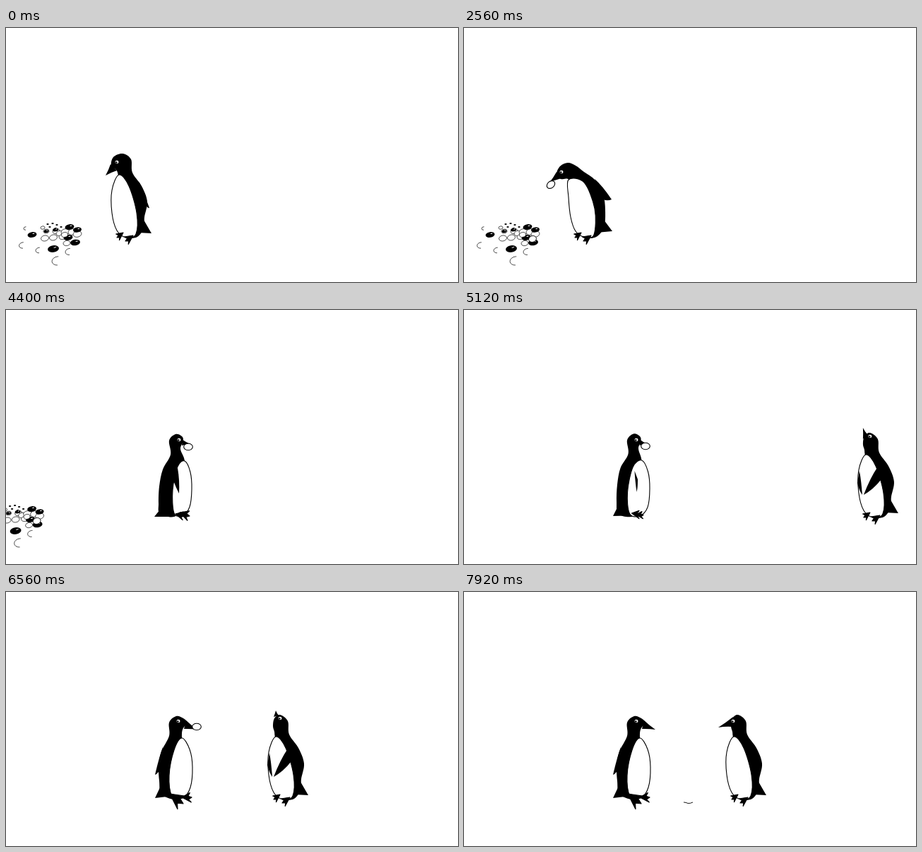
An HTML page with a canvas that plays this animation: 640x360 px, repeating every 8 s.

```html
<!DOCTYPE html>
<html lang="en">
<head>
<meta charset="utf-8">
<title>Penguins and a pebble</title>
<style>
html, body { margin: 0; width: 100%; height: 100%; overflow: hidden; background: #fff; }
canvas { display: block; width: 100vw; height: 100vh; }
</style>
</head>
<body>
<canvas id="stage" width="640" height="360"></canvas>
<script>
const ctx = document.getElementById('stage').getContext('2d');
const LOOP = 8000, STEP = 80, SPEED = 0.1335;

// Poses: flat x,y lists. Every pose has the same parts and point order.
const stand = {
  body: [149,195, 152,183, 165,178, 177,186, 179,205, 192,224, 200,246,
         196,268, 195,284, 184,297, 170,290, 164,235, 159,209, 156,201],
  belly: [160,208, 150,230, 150,262, 157,287, 170,297, 184,292, 185,262, 174,224],
  beak: [148,193, 141,209, 157,202],
  wing: [188,217, 203,255, 195,246],
  wing2: [185,218, 198,248, 192,240],
  tail: [195,272, 206,291, 187,290],
  foot: [166,292, 157,297],
  foot2: [180,296, 169,302],
  eye: [157,190],
  pebble: [137,209]
};
const bend = {
  ...stand,
  body: [102,270, 103,263, 112,259, 122,248, 135,231, 163,220, 190,232,
         199,253, 200,280, 186,297, 176,285, 158,245, 125,261, 107,277],
  belly: [124,262, 140,258, 152,266, 156,286, 168,296, 183,296, 183,262, 152,237],
  beak: [102,268, 101,284, 109,276],
  wing: [171,225, 181,205, 185,230],
  wing2: [158,223, 167,204, 171,223],
  tail: [199,270, 211,275, 192,293],
  eye: [106,267],
  pebble: [99,288]
};
const lift = {
  ...stand,
  body: [131,207, 136,196, 147,191, 158,195, 170,204, 186,216, 197,236,
         200,258, 198,283, 185,297, 170,290, 165,235, 149,215, 137,214],
  belly: [148,215, 148,240, 151,268, 158,288, 170,296, 184,293, 185,256, 170,219],
  beak: [131,204, 121,219, 138,213],
  wing: [185,214, 209,243, 191,240],
  wing2: [184,220, 196,245, 190,240],
  tail: [198,272, 210,288, 188,290],
  eye: [138,204],
  pebble: [123,222]
};
const side = {
  body: [251,186, 249,179, 240,176, 231,185, 233,205, 222,226, 217,250,
         216,274, 218,289, 238,293, 245,280, 250,235, 253,214, 247,197],
  belly: [253,214, 261,230, 263,254, 260,279, 250,291, 238,288, 236,255, 243,222],
  beak: [250,184, 261,190, 249,192],
  wing: [233,228, 245,260, 243,224],
  wing2: [222,230, 224,262, 230,240],
  tail: [218,283, 210,293, 232,293],
  foot: [246,289, 260,292],
  foot2: [240,291, 252,292],
  eye: [245,184],
  pebble: [258,194]
};
const front = {
  body: [250,186, 249,179, 240,175, 231,184, 232,203, 221,222, 217,245,
         216,270, 219,289, 236,293, 245,285, 248,235, 250,213, 247,196],
  belly: [250,212, 260,228, 263,252, 260,280, 247,293, 231,289, 227,262, 235,224],
  beak: [249,184, 256,189, 248,192],
  wing: [224,218, 211,258, 222,245],
  wing2: [261,226, 265,254, 262,240],
  tail: [217,275, 212,291, 230,290],
  foot: [229,291, 239,288],
  foot2: [247,293, 256,289],
  eye: [243,184],
  pebble: [256,192]
};
const offer = {
  body: [256,185, 251,179, 241,176, 231,185, 231,204, 220,226, 216,246,
         217,268, 220,286, 238,294, 248,285, 250,235, 249,207, 250,195],
  belly: [249,207, 260,223, 264,248, 261,277, 250,292, 235,289, 231,260, 238,224],
  beak: [255,182, 271,195, 252,194],
  wing: [222,220, 211,259, 221,246],
  wing2: [222,225, 220,255, 224,245],
  tail: [219,275, 211,292, 228,290],
  foot: [232,288, 251,300],
  foot2: [249,293, 263,291],
  eye: [244,183],
  pebble: [270,191]
};

const mapPose = (pose, fn) =>
  Object.fromEntries(Object.entries(pose).map(([part, list]) => [part, list.map(fn)]));
const shift = (pose, dx, dy = 0) => mapPose(pose, (v, i) => v + (i % 2 ? dy : dx));
const flip = (pose, sum) => mapPose(pose, (v, i) => i % 2 ? v : sum - v);
const mix = (a, b, k) => Object.fromEntries(Object.keys(a).map(
  part => [part, a[part].map((v, i) => v + (b[part][i] - v) * k)]));
const ease = (t, from, to) => {
  const k = Math.min(1, Math.max(0, (t - from) / (to - from)));
  return k * k * (3 - 2 * k);
};
function poseAt(keys, t) {
  let i = 0;
  while (i < keys.length - 2 && t >= keys[i + 1][0]) i++;
  const [from, a] = keys[i], [to, b] = keys[i + 1];
  return mix(a, b, ease(t, from, to));
}

// The mate is the standing pose with its own head and flippers.
const base = shift(stand, 222, -3);
const calm = {
  ...base,
  body: [378,190, 380,179, 388,174, ...base.body.slice(6, 26), 380,198],
  beak: [381,177, 360,192, 379,191],
  wing: [405,220, 419,250, 412,240],
  wing2: [404,225, 418,250, 412,245],
  eye: [381,183]
};
const notice = { ...calm, wing: [399,222, 379,262, 404,240], wing2: [373,228, 377,262, 370,245] };
const lookUp = { ...notice, beak: [378,183, 378,167, 384,176], eye: [388,179] };
const lookOut = { ...notice, beak: [379,177, 382,168, 386,175], eye: [388,179] };

const HOME = -68, WALK = 3490;
const fetchKeys = [
  [80, stand], [720, bend], [1280, bend], [1680, stand], [2080, stand], [2360, bend],
  [2560, lift], [2720, stand], [2880, stand], [3200, flip(front, 410)]
];
const turnKeys = [[3200, shift(front, HOME)], [WALK, shift(side, HOME)]];
const bow = flip(bend, 415);
const giveKeys = [[6640, offer], [7040, bow], [7160, bow], [7520, offer]];
const mateKeys = [
  [6320, lookUp], [6560, lookOut], [6640, lookOut], [7200, notice], [7520, notice], [7920, calm]
];

function heroPose(t) {
  if (t > 720 && t < 1280) return mix(stand, bend, 1 + 0.05 * Math.sin((t - 1200) / 40));
  if (t < 3200) return poseAt(fetchKeys, t);
  if (t < WALK) return poseAt(turnKeys, t);
  if (t >= 6640) return poseAt(giveKeys, t);
  const sway = 0.5 - 0.5 * Math.cos((t - 4400) / 960 * 2 * Math.PI);
  const walk = shift(mix(side, front, sway), Math.min(0, HOME + SPEED * (t - WALK)));
  return mix(walk, offer, ease(t, 6300, 6530));
}

function blob(list, fill, line) {
  const n = list.length / 2;
  const at = i => { const j = (i + n) % n * 2; return [list[j], list[j + 1]]; };
  ctx.beginPath();
  ctx.moveTo(...at(0));
  for (let i = 0; i < n; i++) {
    const [p, a, b, q] = [at(i - 1), at(i), at(i + 1), at(i + 2)];
    ctx.bezierCurveTo(a[0] + (b[0] - p[0]) / 6, a[1] + (b[1] - p[1]) / 6,
      b[0] - (q[0] - a[0]) / 6, b[1] - (q[1] - a[1]) / 6, b[0], b[1]);
  }
  ctx.fillStyle = fill;
  ctx.fill();
  if (line) { ctx.lineWidth = line; ctx.stroke(); }
}

// A pointed shape: two base points, one tip, sides pushed outward by bulge.
function horn([ax, ay, tx, ty, bx, by], bulge) {
  const mx = (ax + bx) / 2, my = (ay + by) / 2;
  const ctrl = (x, y) => [(x + tx) / 2 + (x - mx) * bulge, (y + ty) / 2 + (y - my) * bulge];
  ctx.beginPath();
  ctx.moveTo(ax, ay);
  ctx.quadraticCurveTo(...ctrl(ax, ay), tx, ty);
  ctx.quadraticCurveTo(...ctrl(bx, by), bx, by);
  ctx.closePath();
  ctx.fillStyle = '#000';
  ctx.fill();
}

function foot([x, y, tx, ty]) {
  const dir = Math.atan2(ty - y, tx - x), len = Math.hypot(tx - x, ty - y);
  ctx.beginPath();
  ctx.moveTo(x, y - 2);
  for (let i = -2; i <= 2; i++) {
    const a = dir + i * 0.25, r = len * (i % 2 ? 0.68 : 1);
    ctx.lineTo(x + r * Math.cos(a), y + r * Math.sin(a));
  }
  ctx.closePath();
  ctx.fillStyle = '#000';
  ctx.fill();
  ctx.lineWidth = 1.2;
  ctx.stroke();
}

function oval(x, y, rx, ry, fill, line, rot = 0) {
  ctx.beginPath();
  ctx.ellipse(x, y, rx, ry, rot, 0, 2 * Math.PI);
  ctx.fillStyle = fill;
  ctx.fill();
  if (line) { ctx.lineWidth = line; ctx.stroke(); }
}

function penguin(p, { blink, carries }) {
  horn(p.tail, 0);
  blob(p.body, '#000');
  blob(p.belly, '#fff', 1.1);
  foot(p.foot);
  foot(p.foot2);
  horn(p.beak, -0.15);
  horn(p.wing, 0.4);
  horn(p.wing2, 0.4);
  const [ex, ey] = p.eye;
  if (!blink) {
    oval(ex, ey, 2.5, 2.2, '#fff');
    oval(ex - 0.7, ey + 0.5, 1.4, 1.3, '#000');
  }
  if (carries) {
    const [x, y] = p.pebble;
    oval(x, y, 6.3, 4.7, '#fff', 1.1, x < ex ? -0.7 : 0);
  }
}

const specks = [59,278, 66,277, 72,279, 62,282, 78,282, 70,284];
const pale = [52,283,3, 57,288,4, 55,298,5.5, 67,297,5.5, 71,288,5, 76,291,5,
              84,289,6, 94,289,6, 80,296,5, 101,292,6, 86,305,5];
const dark = [37,293,6.5, 67,313,8, 57,288,3.5, 70,286,4, 90,282,6.5, 101,286,6, 88,297,6.5, 98,304,7];
const arcs = [24,308,5.5, 47,315,5, 73,330,8, 90,317,6, 28,284,3];

function each(list, size, fn) {
  for (let i = 0; i < list.length; i += size) fn(...list.slice(i, i + size));
}

function pile(dx, shuffled) {
  ctx.save();
  ctx.translate(-dx, 0);
  each(arcs, 3, (x, y, r) => {
    ctx.beginPath();
    ctx.ellipse(x, y, r, r * 0.75, -0.2, Math.PI * 0.55, Math.PI * 1.6);
    ctx.lineWidth = 0.7;
    ctx.stroke();
  });
  each(specks, 2, (x, y) => oval(x, y, 1.7, 1.1, '#000'));
  each(pale, 3, (x, y, r) => oval(x, y, r, r * 0.72, '#fff', 0.7, -0.2));
  each(dark, 3, (x, y, r) => {
    oval(x, y, r, r * 0.6, '#000', 0, -0.15);
    oval(x + r * 0.3, y - r * 0.25, r * 0.25, 0.6, '#fff', 0, -0.2);
  });
  oval(83, 293, 4.5, 3.4, '#fff', 0.7, -0.2);
  if (shuffled) oval(97, 299, 5.5, 4.4, '#fff', 0.9, -0.3);
  ctx.restore();
}

function gift(t) {
  if (t < 7600) return oval(317, 295, 6.3, 4.7, '#fff', 1);
  ctx.beginPath();
  ctx.moveTo(311, 298);
  ctx.quadraticCurveTo(314, 298, 317, 299.5);
  ctx.quadraticCurveTo(320, 300, 324, 298);
  ctx.lineWidth = 0.9;
  ctx.stroke();
}

function draw(t) {
  ctx.fillStyle = '#fff';
  ctx.fillRect(0, 0, 640, 360);
  ctx.strokeStyle = '#000';
  ctx.lineJoin = 'round';
  const pan = Math.max(0, SPEED * (t - 4000));
  if (pan < 115) pile(pan, t >= 880);
  if (t >= 7080) gift(t);
  penguin(heroPose(t), { blink: t >= 1840 && t < 2000, carries: t >= 2360 && t < 7080 });
  const away = Math.max(0, SPEED * (6520 - t));
  if (away < 290) penguin(shift(poseAt(mateKeys, t), away), {});
}

const start = performance.now();
function tick() {
  const t = (performance.now() - start) % LOOP;
  draw(Math.floor(t / STEP) * STEP);
  requestAnimationFrame(tick);
}
tick();
</script>
</body>
</html>
```
